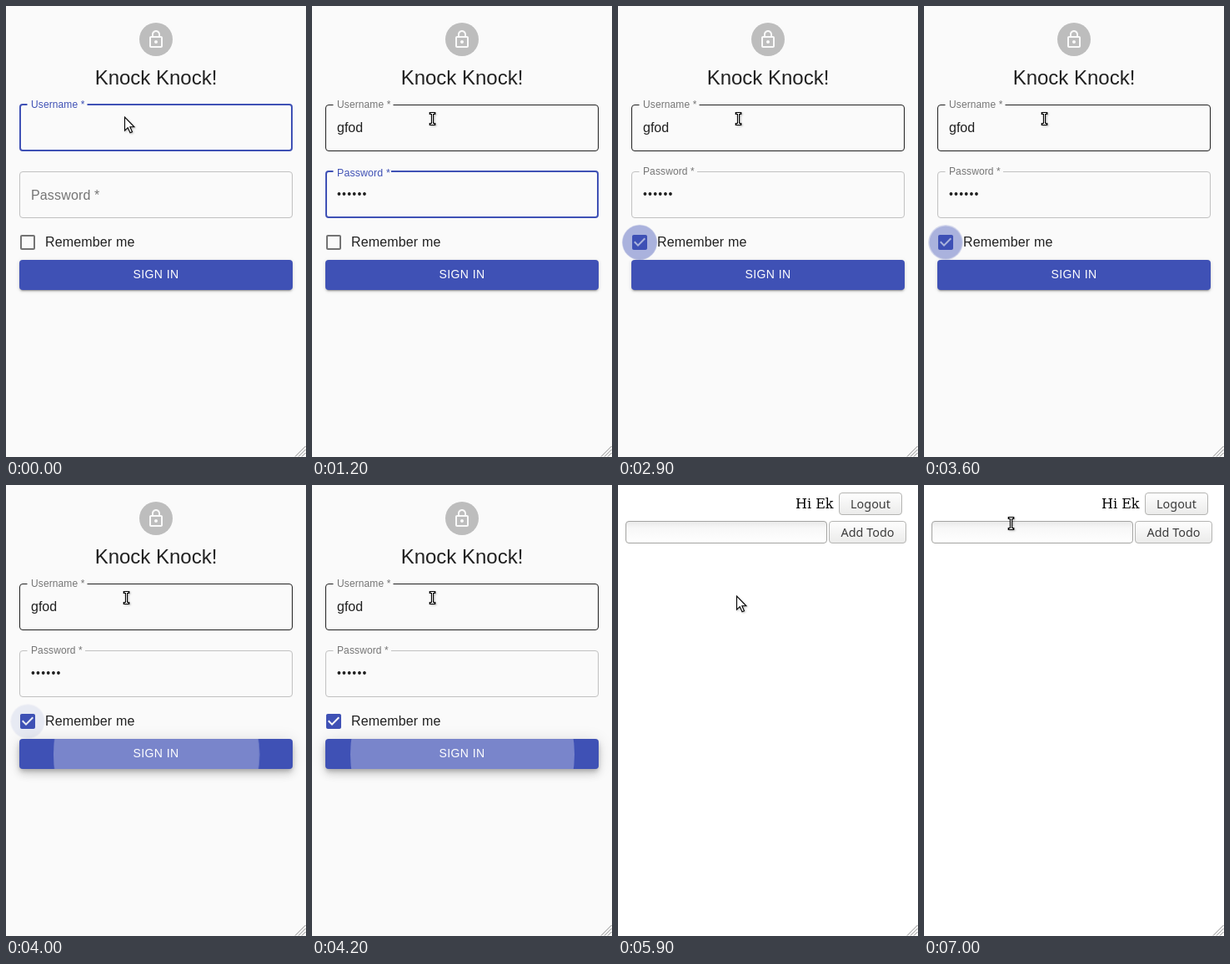
An HTML page that plays this animation: 360x540 px, repeating every 8 s.

```html
<!DOCTYPE html>
<html lang="en">
<head>
<meta charset="utf-8">
<title>Sign in</title>
<style>
  html, body { margin: 0; width: 100%; height: 100%; overflow: hidden; background: #fff; }
  #stage { position: relative; width: 360px; height: 540px; overflow: hidden; }
  #stage > *, #login > * { position: absolute; }
  #login { inset: 0; background: #fafafa; }
  svg { left: 0; top: 0; width: 360px; height: 540px; }
  span { color: #212121; font: 16px/17px "Liberation Sans", Arial, sans-serif; white-space: pre; }
  #title { top: 72px; width: 360px; font-size: 24px; line-height: 27px; text-align: center; }
  .label { left: 30px; letter-spacing: .00938em; }
  .idle, .focus { fill: none; }
  .focus { stroke: #3f51b5; stroke-width: 2; }
  .gap { fill: #fafafa; }

  #button {
    left: 16px; top: 304px; width: 328px; height: 36px;
    border-radius: 4px; overflow: hidden; background: #3f51b5;
    color: #fff; font: 14px/34px "Liberation Sans", Arial, sans-serif;
    letter-spacing: .4px; text-align: center;
  }
  #wave {
    position: absolute; left: 29.7px; top: -116.3px; width: 268.6px; height: 268.6px;
    border-radius: 50%; background: #fff; opacity: .3;
  }
  .pulse { fill: #3f51b5; transform-box: fill-box; transform-origin: center; }

  #hello { left: 213px; top: 13px; color: #000; font: 16px/19px "DejaVu Serif", serif; }
  .cap { color: #3c3c3c; font: 14.4px/19px "Noto Sans", sans-serif; text-align: center; }
  .face { fill: url(#face); stroke: #b4b4b2; }
  .cursor { filter: drop-shadow(1px 1px 1px #0004); }

  /* One loop is 8 s, so 1.25% is 100 ms. */
  #login, #wave, #button, .anim { animation: 8s step-end infinite; }
  #login { animation-name: login; }
  #button { animation-name: lift; }
  #wave { animation-name: wave; }
  .anim.user-focus { animation-name: userFocus; }
  .anim.user-label { animation-name: userLabel; }
  .anim.user-gap { animation-name: userGap; }
  .anim.user-text { animation-name: userText; }
  .anim.pass-focus { animation-name: passFocus; }
  .anim.pass-label { animation-name: passLabel; }
  .anim.pass-gap { animation-name: passGap; }
  .anim.pass-text { animation-name: passText; }
  .anim.box { animation-name: box; }
  .anim.tick { animation-name: tick; }
  .anim.inner { animation-name: pulse; }
  .anim.outer { animation-name: halo; }
  .anim.arrow { animation-name: arrow; }
  .anim.travel { animation-name: travel; }
  .anim.beam { animation-name: beam; }

  @keyframes login { 0% { visibility: visible } 72.5%, 100% { visibility: hidden } }
  @keyframes userFocus { 0% { opacity: 1 } 13.75%, 100% { opacity: 0 } }
  @keyframes userText { 0% { opacity: 0 } 12.5% { opacity: 1 } 63.75%, 100% { opacity: 0 } }
  @keyframes userGap { 0% { opacity: 1 } 66.25%, 100% { opacity: 0 } }
  @keyframes userLabel {
    0% { top: 111px; font-size: 12px; line-height: 14px; color: #3f51b5 }
    13.75% { top: 111px; font-size: 12px; line-height: 14px; color: #757575 }
    65% { top: 123px; font-size: 14px; line-height: 16px; color: #757575 }
    66.25% { top: 135px; font-size: 15.7px; line-height: 17px; color: #757575 }
    67.5%, 100% { top: 138px; font-size: 16px; line-height: 17px; color: #757575 }
  }
  @keyframes passFocus { 0% { opacity: 0 } 13.75% { opacity: 1 } 28.75%, 100% { opacity: 0 } }
  @keyframes passText { 0% { opacity: 0 } 15% { opacity: 1 } 63.75%, 100% { opacity: 0 } }
  @keyframes passGap { 0% { opacity: 0 } 13.75% { opacity: 1 } 66.25%, 100% { opacity: 0 } }
  @keyframes passLabel {
    0% { top: 218px; font-size: 16px; line-height: 17px; color: #757575 }
    13.75% { top: 205px; font-size: 14px; line-height: 16px; color: #3f51b5 }
    15% { top: 193px; font-size: 12.4px; line-height: 14px; color: #3f51b5 }
    16.25% { top: 191px; font-size: 12px; line-height: 14px; color: #3f51b5 }
    28.75% { top: 191px; font-size: 12px; line-height: 14px; color: #757575 }
    65% { top: 203px; font-size: 14px; line-height: 16px; color: #757575 }
    66.25% { top: 215px; font-size: 15.7px; line-height: 17px; color: #757575 }
    67.5%, 100% { top: 218px; font-size: 16px; line-height: 17px; color: #757575 }
  }
  @keyframes box { 0% { opacity: 1 } 28.75%, 100% { opacity: 0 } }
  @keyframes tick { 0% { opacity: 0 } 28.75%, 100% { opacity: 1 } }
  @keyframes pulse {
    0% { transform: scale(0); opacity: .3 }
    28.75% { transform: scale(.55); opacity: .3 }
    30% { transform: scale(1); opacity: .3; animation-timing-function: steps(12) }
    45% { transform: scale(.92); opacity: .3; animation-timing-function: steps(5) }
    51.25%, 100% { transform: scale(.93); opacity: 0 }
  }
  @keyframes halo {
    0% { opacity: 0 }
    30% { opacity: .17 }
    45% { opacity: .17; animation-timing-function: steps(5) }
    51.25%, 100% { opacity: 0 }
  }
  @keyframes lift {
    0% { box-shadow: 0 3px 1px -2px #0003, 0 2px 2px 0 #00000024, 0 1px 5px 0 #0000001f }
    46.25% { box-shadow: 0 3px 3px -2px #0003, 0 4px 6px 0 #00000024, 0 1px 11px 0 #0000001f }
    47.5%, 100% { box-shadow: 0 3px 5px -1px #0003, 0 6px 10px 0 #00000024, 0 1px 18px 0 #0000001f }
  }
  @keyframes wave {
    0% { transform: scale(0) }
    46.25% { transform: scale(.1) }
    47.5% { transform: scale(.42) }
    48.75% { transform: scale(.76) }
    50% { transform: scale(.92) }
    51.25% { transform: scale(.98) }
    52.5% { transform: scale(1); animation-timing-function: steps(9) }
    63.75% { transform: scale(.926); animation-timing-function: steps(2) }
    66.25% { transform: scale(.92); animation-timing-function: steps(5) }
    72.5%, 100% { transform: scale(.945) }
  }
  @keyframes arrow {
    0% { opacity: 1 } 6.25% { opacity: 0 } 73.75% { opacity: 1 } 87.5%, 100% { opacity: 0 }
  }
  @keyframes travel {
    0% { transform: none }
    78.75% { transform: none; animation-timing-function: steps(2) }
    81.25% { transform: translate(-8px, -18px); animation-timing-function: steps(3) }
    85% { transform: translate(-32px, -72px); animation-timing-function: steps(2) }
    87.5%, 100% { transform: translate(-40px, -89px) }
  }
  @keyframes beam {
    0% { opacity: 0; transform: none }
    6.25% { opacity: 1; transform: none }
    73.75% { opacity: 0; transform: none }
    87.5%, 100% { opacity: 1; transform: translate(-40px, -89px) }
  }
</style>
</head>
<body>
<div id="stage">
  <svg viewBox="0 0 360 540">
    <defs>
      <linearGradient id="face" x2="0" y2="1">
        <stop stop-color="#fefefe"/><stop offset="1" stop-color="#ebebea"/>
      </linearGradient>
      <linearGradient id="well" x2="0" y2="1">
        <stop stop-color="#e9e9e9"/><stop offset=".3" stop-color="#f7f7f7"/><stop offset="1" stop-color="#fff"/>
      </linearGradient>
    </defs>
    <rect class="face" x="265.5" y="9.5" width="75" height="26" rx="3.5"/>
    <rect x="9.5" y="43.5" width="241" height="26" rx="3.5" fill="url(#well)" stroke="#a3a3a1"/>
    <rect class="face" x="253.5" y="43.5" width="92" height="26" rx="3.5"/>
  </svg>
  <span id="hello">Hi Ek</span>
  <span class="cap" style="left:265px;top:13px;width:76px">Logout</span>
  <span class="cap" style="left:253px;top:47px;width:93px">Add Todo</span>

  <div id="login">
    <svg viewBox="0 0 360 540">
      <circle cx="180" cy="40" r="20" fill="#bdbdbd"/>
      <path transform="translate(168 28)" fill="#fafafa" d="M12 17c1.1 0 2-.9 2-2s-.9-2-2-2-2 .9-2 2 .9 2 2 2zm6-9h-1V6c0-2.76-2.24-5-5-5S7 3.24 7 6v2H6c-1.1 0-2 .9-2 2v10c0 1.1.9 2 2 2h12c1.1 0 2-.9 2-2V10c0-1.1-.9-2-2-2zM8.9 6c0-1.71 1.39-3.1 3.1-3.1s3.1 1.39 3.1 3.1v2H8.9V6zM18 20H6V10h12v10z"/>

      <rect class="idle" x="16.5" y="118.5" width="327" height="55" rx="3.5" stroke="#212121"/>
      <g class="anim user-focus">
        <rect class="gap" x="16" y="117" width="328" height="57"/>
        <rect class="focus" x="17" y="118" width="326" height="55" rx="3"/>
      </g>
      <rect class="gap anim user-gap" x="25.5" y="116" width="72" height="4"/>

      <rect class="idle" x="16.5" y="198.5" width="327" height="55" rx="3.5" stroke="#c1c1c1"/>
      <g class="anim pass-focus">
        <rect class="gap" x="16" y="197" width="328" height="57"/>
        <rect class="focus" x="17" y="198" width="326" height="55" rx="3"/>
      </g>
      <rect class="gap anim pass-gap" x="25.5" y="196" width="69.5" height="4"/>
    </svg>

    <span id="title">Knock Knock!</span>
    <span class="label anim user-label">Username&nbsp;*</span>
    <span class="anim user-text" style="left:30px;top:137px">gfod</span>
    <span class="label anim pass-label">Password&nbsp;*</span>
    <span class="anim pass-text" style="left:30px;top:217px;font-size:14px;letter-spacing:1.2px">••••••</span>
    <span style="left:47px;top:274px;letter-spacing:.00938em">Remember me</span>
    <div id="button">SIGN IN<div id="wave"></div></div>

    <svg viewBox="0 0 360 540">
      <g transform="translate(14 271)">
        <path class="anim box" fill="#737373" d="M19 5v14H5V5h14m0-2H5c-1.1 0-2 .9-2 2v14c0 1.1.9 2 2 2h14c1.1 0 2-.9 2-2V5c0-1.1-.9-2-2-2z"/>
        <path class="anim tick" fill="#3f51b5" d="M19 3H5c-1.11 0-2 .9-2 2v14c0 1.1.89 2 2 2h14c1.11 0 2-.9 2-2V5c0-1.1-.89-2-2-2zm-9 14l-5-5 1.41-1.41L10 14.17l7.59-7.59L19 8l-9 9z"/>
      </g>
      <circle class="pulse outer anim" cx="26" cy="283" r="21"/>
      <circle class="pulse inner anim" cx="26" cy="283" r="21.5"/>
    </svg>
  </div>

  <svg viewBox="0 0 360 540">
    <path d="M347 539.5l12.5-12.5M351 539.5l8.5-8.5M355 539.5l4.5-4.5" stroke="#8a8a8a" fill="none"/>
    <g class="anim arrow">
      <path class="cursor anim travel" d="M142.5 133v16.2l3.7-3.5 2.8 6.1 2.5-1.1-2.7-5.9h5.1z" fill="#fff" stroke="#000" stroke-width="1.1"/>
    </g>
    <g class="cursor anim beam" fill="none">
      <path d="M142.3 128.5h4.4M142.3 141.5h4.4M144.5 128.5v13" stroke="#000" stroke-width="3.2" stroke-linecap="square"/>
      <path d="M142.3 128.5h4.4M142.3 141.5h4.4M144.5 128.5v13" stroke="#fff"/>
    </g>
  </svg>
</div>
</body>
</html>
```
